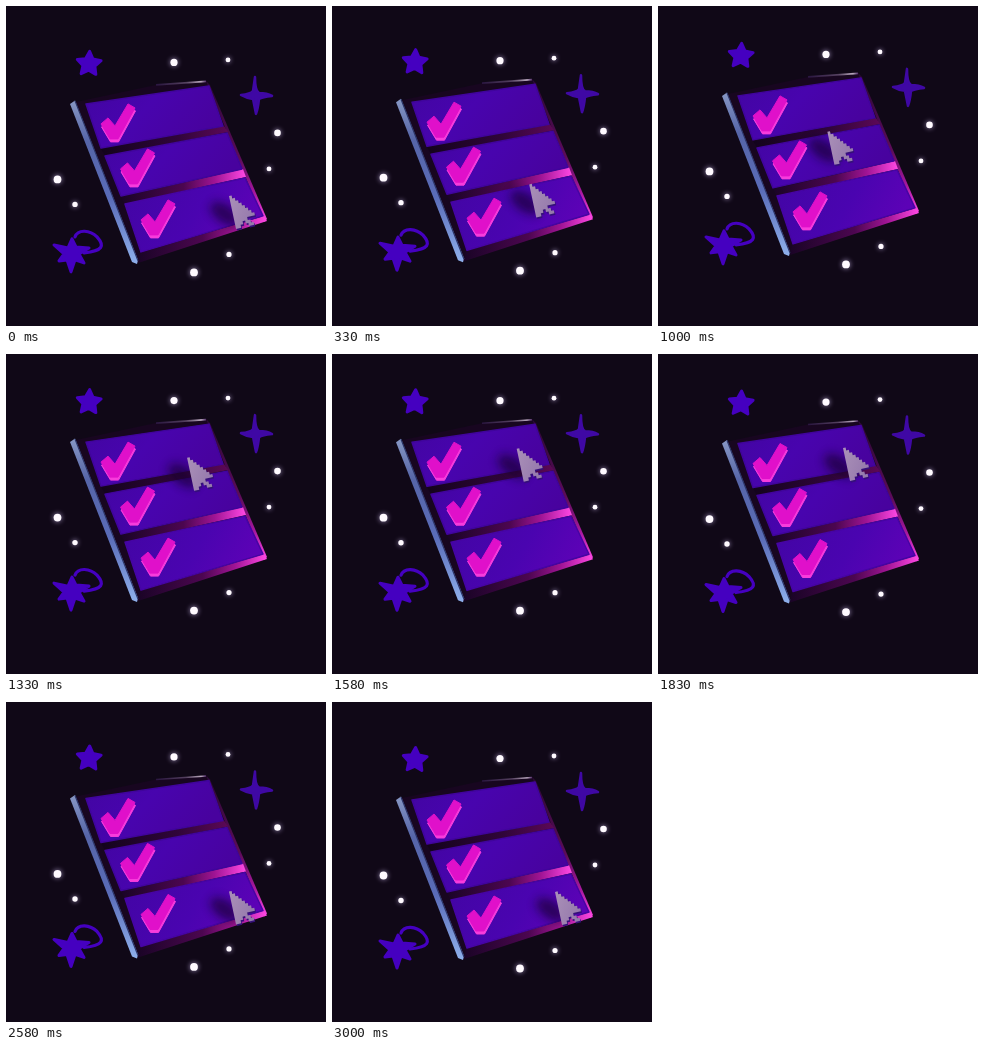
These frames come from a looping animation (320x320 px, 3.08 s). An HTML page:

```html
<!DOCTYPE html>
<html lang="en">
<head>
<meta charset="utf-8">
<title>Floating checklist</title>
<style>
  html, body { margin: 0; width: 100%; height: 100%; overflow: hidden; background: #100817; }
  svg { display: block; width: 100vw; height: 100vh; }
</style>
</head>
<body>
<svg viewBox="0 0 320 320">
  <defs>
    <linearGradient id="panelFill" x1="0" y1="0" x2="1" y2=".4">
      <stop offset="0" stop-color="#4205a2"/>
      <stop offset=".5" stop-color="#4804ae"/>
      <stop offset="1" stop-color="#48029e"/>
    </linearGradient>
    <linearGradient id="litPanel" x1="0" y1="0" x2="1" y2=".3">
      <stop offset="0" stop-color="#4205a4"/>
      <stop offset=".6" stop-color="#4a04b0"/>
      <stop offset="1" stop-color="#5c02b6"/>
    </linearGradient>
    <linearGradient id="gap">
      <stop offset="0" stop-color="#1a0426"/>
      <stop offset=".5" stop-color="#4c0650"/>
      <stop offset=".75" stop-color="#a01494"/>
      <stop offset="1" stop-color="#ff48e4"/>
    </linearGradient>
    <linearGradient id="dimGap">
      <stop offset="0" stop-color="#13031c"/>
      <stop offset=".6" stop-color="#30053a"/>
      <stop offset="1" stop-color="#5c0856"/>
    </linearGradient>
    <linearGradient id="spineFill" x1="0" y1="0" x2="0" y2="1">
      <stop offset="0" stop-color="#8797c4"/>
      <stop offset=".25" stop-color="#5665a8"/>
      <stop offset=".6" stop-color="#5a6cb8"/>
      <stop offset="1" stop-color="#8fb0ec"/>
    </linearGradient>
    <linearGradient id="topEdge">
      <stop offset="0" stop-color="#2a1640"/>
      <stop offset=".6" stop-color="#54405f"/>
      <stop offset=".9" stop-color="#b8a8bc"/>
      <stop offset="1" stop-color="#54306c"/>
    </linearGradient>
    <linearGradient id="rightEdge" x1="0" y1="0" x2="0" y2="1">
      <stop offset="0" stop-color="#2a0834"/>
      <stop offset=".55" stop-color="#5c0c5a"/>
      <stop offset=".8" stop-color="#a818a0"/>
      <stop offset="1" stop-color="#ff48e4"/>
    </linearGradient>
    <linearGradient id="arrowFill" x1="0" y1="0" x2="1" y2="1">
      <stop offset="0" stop-color="#aa90b8"/>
      <stop offset="1" stop-color="#9276aa"/>
    </linearGradient>
    <filter id="soft" x="-100%" y="-100%" width="300%" height="300%"><feGaussianBlur stdDeviation="5"/></filter>
    <filter id="halo" x="-200%" y="-200%" width="500%" height="500%"><feGaussianBlur stdDeviation="2"/></filter>
    <clipPath id="face"><path d="M72 97 150 79 201 75 261 215 131 257z"/></clipPath>
    <path id="tick" stroke-width="1" stroke-linejoin="round" d="M95 118 102 112 109 120 122 98 129 102 112 133 104 133z"/>
    <g id="check">
      <use href="#tick" x=".5" y="3" fill="#f83cdc" stroke="#f83cdc"/>
      <use href="#tick" fill="#e010ca" stroke="#e010ca"/>
    </g>
    <path id="arrow" transform="matrix(2.6 -.6 .64 3 0 0)"
          d="M0 0h1v1h1v1h1v1h1v1h1v1h1v1h1v1h1v1H5v1h1v1h1v1H5v-1H4V9H3v1H2v1H0z"/>
  </defs>

  <rect width="320" height="320" fill="#100817"/>

  <g id="scene">
    <g fill="#4500c0" stroke="#4500c0" stroke-linejoin="round" stroke-linecap="round">
      <path id="star" stroke-width="3"/>
      <path fill="#3f08a4" stroke="#3f08a4" stroke-width="2.500" d="M249 71Q249 85 253 87Q261 87 266 90Q256 91 253 93Q252 103 250 108Q248 98 247 93Q240 92 235 89Q245 88 247 85Q248 78 249 71z"/>
      <path stroke-width="3" d="M66 233 70 241 83 242 73 248 78 257 69 254 65 266 61 254 53 255 58 248 48 239 62 242z"/>
      <path fill="none" stroke-width="3.200" d="M69 231C72 223 84 224 91 231C99 240 97 245 78 247"/>
    </g>
    <g id="dots"></g>

    <g id="card">
      <path d="M70 96 150 79 201 75 261 215 131 257z" fill="#180620"/>
      <path d="M150 79 200 75.500" stroke="url(#topEdge)" stroke-width="1.600"/>
      <path d="M200 75 204 79 261 213 258 216z" fill="url(#rightEdge)"/>
      <path d="M95 143 218 120 222 126 99 150z" fill="url(#dimGap)"/>
      <path d="M115 191 237 163 240 171 119 198z" fill="url(#gap)"/>
      <path d="M134 247 258 210 261 215 132 257z" fill="url(#gap)"/>
      <g stroke-linejoin="round" stroke-width="1.500">
        <path d="M80 98 203 80 217 120 95 142z" fill="url(#panelFill)" stroke="#40049c"/>
        <path d="M99 150 221 127 236 163 115 190z" fill="url(#panelFill)" stroke="#40049c"/>
        <path d="M119 198 239 172 257 210 135 246z" fill="url(#litPanel)" stroke="#4604a4"/>
      </g>
      <path d="M64 98 69 94.500 132 254 131 258 126 256z" fill="url(#spineFill)"/>
      <path d="M69 95 132 255" stroke="#2c3468" stroke-width="1.200"/>
      <g clip-path="url(#face)">
        <g id="shadow"><ellipse cx="-4" cy="18" rx="17" ry="9" transform="rotate(35 -4 18)" fill="#13022f" opacity=".65" filter="url(#soft)"/></g>
      </g>
      <use href="#check"/>
      <use href="#check" x="19.500" y="45"/>
      <use href="#check" x="40" y="96"/>
    </g>
  </g>

  <g id="cursor">
    <use href="#arrow" x="1" y="1.500" fill="#35107a"/>
    <use href="#arrow" fill="url(#arrowFill)"/>
  </g>
</svg>

<script>
const LOOP = 3080, STEP = 1000 / 12;
const $ = id => document.getElementById(id);

const starPoints = Array.from({ length: 10 }, (_, i) => {
  const angle = -Math.PI / 2 + 0.05 + i * Math.PI / 5;
  const radius = i % 2 ? 6.3 : 12.5;
  return [83 + radius * Math.cos(angle), 58 + radius * Math.sin(angle)];
});
$("star").setAttribute("d", "M" + starPoints.join("L") + "z");

const dots = [[168, 56.5, 3.6], [222, 54, 2.4], [271.5, 127, 3.3], [263, 163, 2.4],
              [51.5, 173.5, 3.9], [69, 198.5, 2.7], [188, 266.5, 3.9], [223, 248.5, 2.6]];
$("dots").innerHTML = dots.map(([x, y, r]) =>
  `<circle cx="${x}" cy="${y}" r="${r * 1.3}" fill="#b9a8d8" opacity=".5" filter="url(#halo)"/>
   <circle cx="${x}" cy="${y}" r="${r}" fill="#fffaff"/>`).join("");

// Cursor path: time, x, y, then velocity in px per ms.
// A long eased arc up to the first row, a pause, a quicker straight move back and a rest.
const path = [
  [0, 223, 190, 0, 0],
  [670, 166, 153, -0.03, -0.082],
  [1330, 181, 104, 0.02, -0.05],
  [1670, 185, 94, 0, 0],
  [1830, 185, 94, 0, 0],
  [2170, 199, 128, 0.079, 0.197],
  [2580, 223, 189.5, 0, 0],
  [LOOP, 223, 190, 0, 0]
];

function cursorAt(t) {
  const next = path.findIndex(knot => knot[0] > t);
  const a = path[next - 1], b = path[next];
  const span = b[0] - a[0], u = (t - a[0]) / span, v = 1 - u;
  return [1, 2].map(k =>
    a[k] * v * v * (1 + 2 * u) + b[k] * u * u * (3 - 2 * u) +
    span * u * v * (a[k + 2] * v - b[k + 2] * u));
}

function move(id, x, y) {
  $(id).setAttribute("transform", `translate(${x} ${y})`);
}

function draw(now) {
  // Twelve poses a second; the small lead absorbs rounding to 10 ms
  const frame = Math.floor((now % LOOP + 3.4) / STEP);
  const t = Math.min(frame, 36) * STEP;
  const rise = 5 * (1 - Math.cos((t + 100) / LOOP * 2 * Math.PI));
  const [x, y] = cursorAt(t);
  move("scene", 0, -rise);
  move("cursor", x, y);
  move("shadow", x, y + rise);
}

const start = performance.now();
function tick() {
  draw(performance.now() - start);
  requestAnimationFrame(tick);
}
tick();
</script>
</body>
</html>
```
